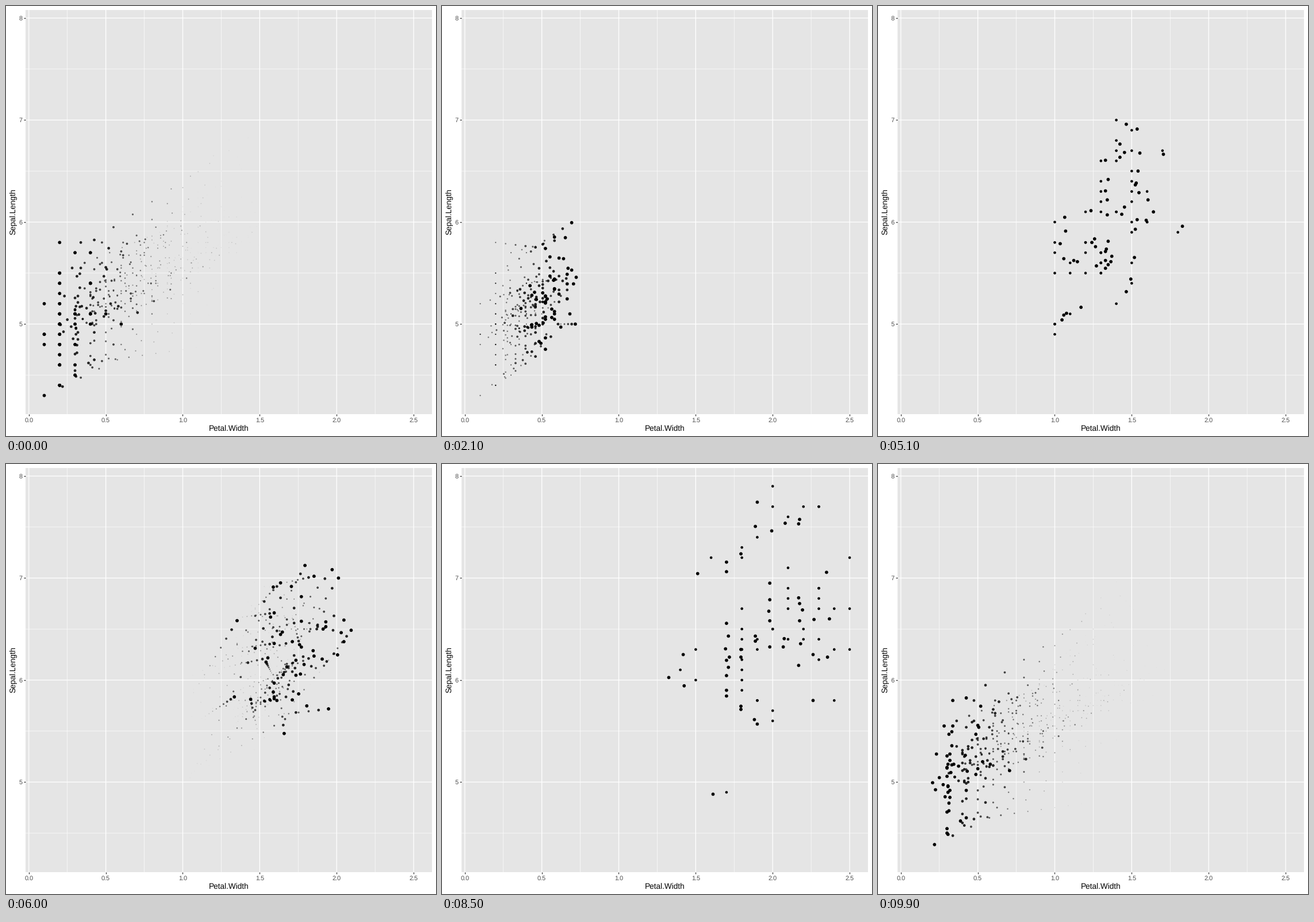
Animation, 748 px wide and 748 px high, one loop 10 s. Source, as a matplotlib script:

```python
import numpy as np
import matplotlib.pyplot as plt
from matplotlib.animation import FuncAnimation

SIZE, DPI, FRAMES = 748, 100, 100
PX = 72 / DPI        # one pixel in points
UNIT = 1.24          # pixels per typographic point of the plot theme
WAKE = 10            # frames a trail lasts

plt.rcParams.update({"font.family": "Liberation Sans", "text.hinting": "none"})

# Measurements in tenths: sepal length and petal width of each species.
setosa_len = [51, 49, 47, 46, 50, 54, 46, 50, 44, 49, 54, 48, 48, 43, 58, 57, 54,
              51, 57, 51, 54, 51, 46, 51, 48, 50, 50, 52, 52, 47, 48, 54, 52, 55,
              49, 50, 55, 49, 44, 51, 50, 45, 44, 50, 51, 48, 51, 46, 53, 50]
setosa_wid = [2, 2, 2, 2, 2, 4, 3, 2, 2, 1, 2, 2, 1, 1, 2, 4, 4,
              3, 3, 3, 2, 4, 2, 5, 2, 2, 4, 2, 2, 2, 2, 4, 1, 2,
              2, 2, 2, 1, 2, 2, 3, 3, 2, 6, 4, 3, 2, 2, 2, 2]
versicolor_len = [70, 64, 69, 55, 65, 57, 63, 49, 66, 52, 50, 59, 60, 61, 56, 67, 56,
                  58, 62, 56, 59, 61, 63, 61, 64, 66, 68, 67, 60, 57, 55, 55, 58, 60,
                  54, 60, 67, 63, 56, 55, 55, 61, 58, 50, 56, 57, 57, 62, 51, 57]
versicolor_wid = [14, 15, 15, 13, 15, 13, 16, 10, 13, 14, 10, 15, 10, 14, 13, 14, 15,
                  10, 15, 11, 18, 13, 15, 12, 13, 14, 14, 17, 15, 10, 11, 10, 12, 16,
                  15, 16, 15, 13, 13, 13, 12, 14, 12, 10, 13, 12, 13, 13, 11, 13]
virginica_len = [63, 58, 71, 63, 65, 76, 49, 73, 67, 72, 65, 64, 68, 57, 58, 64, 65,
                 77, 77, 60, 69, 56, 77, 63, 67, 72, 62, 61, 64, 72, 74, 79, 64, 63,
                 61, 77, 63, 64, 60, 69, 67, 69, 58, 68, 67, 67, 63, 65, 62, 59]
virginica_wid = [25, 19, 21, 18, 22, 21, 17, 18, 18, 25, 20, 19, 21, 20, 24, 23, 18,
                 22, 23, 15, 23, 20, 20, 18, 21, 18, 18, 18, 21, 16, 19, 20, 22, 15,
                 14, 23, 24, 18, 18, 21, 24, 23, 19, 23, 25, 23, 19, 20, 23, 18]


def cloud(width, length):
    return np.column_stack([width, length]) / 10


setosa = cloud(setosa_wid, setosa_len)
versicolor = cloud(versicolor_wid, versicolor_len)
virginica = cloud(virginica_wid, virginica_len)

# Each species rests, then moves linearly to the next one.
KEY_TIMES = [0, 16, 33, 50, 67, 84, 100]
KEY_STATES = [setosa, setosa, versicolor, versicolor, virginica, virginica, setosa]


def positions(frame):
    frame %= FRAMES
    i = np.searchsorted(KEY_TIMES, frame, side="right") - 1
    t = (frame - KEY_TIMES[i]) / (KEY_TIMES[i + 1] - KEY_TIMES[i])
    return KEY_STATES[i] * (1 - t) + KEY_STATES[i + 1] * t


fig = plt.figure(figsize=(SIZE / DPI, SIZE / DPI), dpi=DPI, facecolor="white")
left, right, top, bottom = 34.4, 741.2, 6.75, 709.5
ax = fig.add_axes([left / SIZE, 1 - bottom / SIZE,
                   (right - left) / SIZE, (bottom - top) / SIZE])
ax.set(facecolor="#e5e5e5", xlim=(-0.02, 2.62), ylim=(4.12, 8.08))
ax.set_xticks(np.arange(0, 2.6, 0.5))
ax.set_xticks(np.arange(0.25, 2.5, 0.5), minor=True)
ax.set_yticks([5, 6, 7, 8])
ax.set_yticks([4.5, 5.5, 6.5, 7.5], minor=True)
ax.xaxis.set_major_formatter("{x:.1f}")
ax.yaxis.set_major_formatter("{x:.0f}")
ax.spines[:].set_visible(False)
ax.set_axisbelow(True)
ax.tick_params(length=2.75 * UNIT * PX, width=1.3 * PX, pad=2.2 * UNIT * PX,
               color="#333333", labelcolor="#4d4d4d", labelsize=8.8 * UNIT * PX)
ax.tick_params(which="minor", length=0)
ax.grid(which="major", color="white", linewidth=1.32 * PX, snap=False)
ax.grid(which="minor", color="white", linewidth=0.66 * PX, snap=False)

title = dict(fontsize=11 * UNIT * PX, color="black", ha="center", va="baseline")
fig.text((left + right) / 2 / SIZE, 1 - 738.4 / SIZE, "Petal.Width", **title)
fig.text(16.6 / SIZE, 1 - (top + bottom) / 2 / SIZE, "Sepal.Length",
         rotation=90, rotation_mode="anchor", **title)

# Oldest trail first, current points last.
ages = np.arange(WAKE - 1, -1, -1)
fade = np.repeat(1 - ages / WAKE, len(setosa))
radius = 0.44 + 1.98 * fade ** 3
ink = np.zeros((len(fade), 4))
ink[:, 3] = fade ** 2
dots = ax.scatter(np.ones(len(fade)), np.full(len(fade), 5), s=(2 * radius * PX) ** 2,
                  facecolors=ink, edgecolors=ink, linewidths=0.88 * PX,
                  clip_on=True, zorder=3)
dots.set_snap(False)


def update(frame):
    dots.set_offsets(np.vstack([positions(frame - age) for age in ages]))
    return (dots,)


anim = FuncAnimation(fig, update, frames=FRAMES, interval=100, repeat=True,
                     repeat_delay=0, cache_frame_data=False)
plt.show()
```
